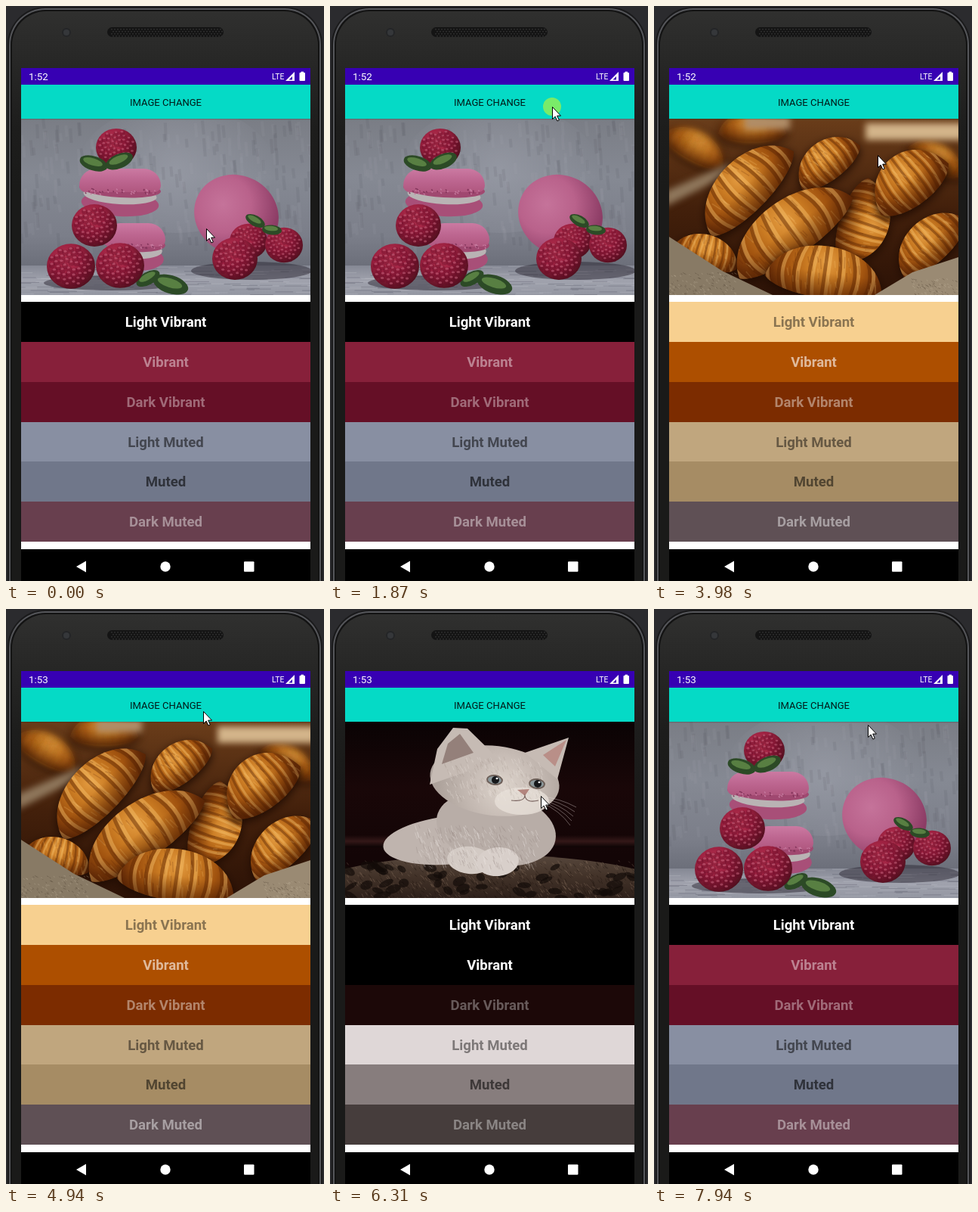
Write an HTML page with a canvas that moves like this. It is 421 px wide and 760 px high and loops after 8 s.

```html
<!DOCTYPE html>
<html lang="en">
<head>
<meta charset="utf-8">
<title>Image palette</title>
<style>
html, body { margin: 0; width: 100%; height: 100%; overflow: hidden; background: #2b2b2e; }
#stage { position: absolute; left: 0; top: 0; width: 421px; height: 760px; overflow: hidden; font-family: Roboto, Arial, sans-serif; }
#stage > * { position: absolute; }
#stage canvas { left: 0; top: 0; }
.row { left: 20px; width: 383px; text-align: center; font-weight: 700; font-size: 18.6px; line-height: 55px; }
#btn { left: 20px; top: 104px; width: 383px; text-align: center; font-size: 13.05px; line-height: 47px; color: #021b19; }
#clock { left: 30px; top: 86px; font-size: 13.4px; line-height: 16px; color: #fff; }
#net { left: 352px; top: 86px; font-size: 10.4px; line-height: 15px; color: #fff; }
</style>
</head>
<body>
<div id="stage">
<canvas id="base" width="421" height="760"></canvas>
<div id="clock">1:52</div>
<div id="net">LTE</div>
<div id="btn">IMAGE CHANGE</div>
<canvas id="over" width="421" height="760"></canvas>
</div>
<script>
const LOOP = 8000, TICK = 68.5, TAU = Math.PI * 2;
const stage = document.getElementById('stage');
const clock = document.getElementById('clock');
const base = document.getElementById('base').getContext('2d');
const over = document.getElementById('over').getContext('2d');

let seed = 7;
function rnd(a = 0, b = 1) {
  seed = (seed * 16807) % 2147483647;
  return a + (b - a) * seed / 2147483647;
}
function fade(g, cols) {
  cols.forEach((col, i) => g.addColorStop(i / (cols.length - 1), col));
  return g;
}
const down = (c, y0, y1, ...cols) => fade(c.createLinearGradient(0, y0, 0, y1), cols);
const glow = (c, x, y, r, ...cols) => fade(c.createRadialGradient(x, y, 0, x, y, r), cols);

function rect(c, x, y, w, h, fill, r = 0) {
  c.beginPath(); c.roundRect(x, y, w, h, r); c.fillStyle = fill; c.fill();
}
function oval(c, x, y, rx, ry, fill, rot = 0) {
  c.beginPath(); c.ellipse(x, y, rx, ry, rot, 0, TAU); c.fillStyle = fill; c.fill();
}
function poly(c, fill, ...pts) {
  c.beginPath();
  for (let i = 0; i < pts.length; i += 2) c.lineTo(pts[i], pts[i + 1]);
  c.closePath(); c.fillStyle = fill; c.fill();
}
// n short strokes scattered over a box
function grain(c, n, x, y, w, h, dx, dy, width, ...cols) {
  c.lineWidth = width;
  for (let i = 0; i < n; i++) {
    const px = x + rnd() * w, py = y + rnd() * h;
    c.strokeStyle = cols[i % cols.length];
    c.beginPath(); c.moveTo(px, py); c.lineTo(px + dx * rnd(.4, 1), py + dy * rnd(.4, 1)); c.stroke();
  }
}
function photo(draw) {
  const cv = document.createElement('canvas');
  cv.width = 383; cv.height = 233;
  const c = cv.getContext('2d');
  c.translate(-20, -149);
  draw(c);
  return cv;
}

function berry(c, x, y, r = 30) {
  oval(c, x, y, r, r * .93, glow(c, x - r * .2, y - r * .3, r * 1.3, '#b83552', '#9c2040', '#52101f'));
  for (let i = 1; i < 48; i++) {
    const d = Math.sqrt(i / 48) * r * .88, px = x + Math.cos(i * 2.4) * d, py = y + Math.sin(i * 2.4) * d * .93;
    oval(c, px, py + 1, r * .13, r * .12, 'rgba(95,10,34,.35)');
    oval(c, px - .5, py - 1, r * .07, r * .05, 'rgba(230,130,155,.4)');
  }
}
function leaf(c, x, y, len, rot) {
  oval(c, x, y, len, len * .5, '#2c4a26', rot);
  oval(c, x - 1, y - 2, len * .7, len * .25, '#587f42', rot);
}
function macaron(c, x, y, w) {
  oval(c, x, y + 46, w * .95, 17, '#a84f78', .06);
  oval(c, x, y + 35, w * .9, 12, '#b9b3b4', .06);
  oval(c, x, y + 27, w, 11, '#a04870', .06);
  rect(c, x - w, y, w * 2, 31, down(c, y, y + 31, '#cb7aa2', '#bd6690', '#b0577f'), [26, 26, 10, 10]);
  grain(c, 40, x - w * .9, y + 26, w * 1.8, 7, 2, 2, 1.5, '#c67a9f', '#84365c');
}
const sweets = photo(c => {
  rect(c, 20, 149, 383, 233, down(c, 149, 382, '#7a7d85', '#858993', '#7b7e89', '#5d606b'));
  oval(c, 225, 215, 130, 85, glow(c, 225, 215, 130, 'rgba(160,163,174,.55)', 'rgba(160,163,174,0)'));
  grain(c, 250, 20, 149, 383, 165, 2, 24, 4, 'rgba(64,66,76,.1)', 'rgba(180,182,192,.09)');
  rect(c, 20, 343, 383, 39, down(c, 343, 382, '#858894', '#a0a2ad', '#9497a2'));
  grain(c, 120, 0, 344, 400, 38, 40, 0, 1, 'rgba(70,72,86,.3)', 'rgba(205,206,214,.25)');
  oval(c, 325, 350, 80, 12, 'rgba(45,40,52,.5)');
  oval(c, 140, 366, 90, 10, 'rgba(45,40,52,.5)');
  oval(c, 305, 276, 57, 52, glow(c, 287, 262, 75, '#c5739a', '#b9628b', '#8c3c65'), .5);
  macaron(c, 170, 287, 41);
  macaron(c, 151, 215, 54);
  berry(c, 146, 187, 27);
  leaf(c, 116, 208, 19, .3); leaf(c, 150, 205, 19, -.4);
  leaf(c, 188, 360, 17, -.5); leaf(c, 218, 368, 24, .3);
  berry(c, 117, 290); berry(c, 86, 344, 32); berry(c, 151, 343, 32);
  berry(c, 321, 311, 25); berry(c, 368, 316, 25);
  leaf(c, 330, 284, 14, .5); leaf(c, 352, 296, 13, .1);
  berry(c, 303, 334);
});

function croissant(c, x, y, len, rot, fat = .47) {
  const w = len * fat;
  c.save(); c.translate(x, y); c.rotate(rot);
  c.shadowColor = '#1f0b02'; c.shadowBlur = 12; c.shadowOffsetY = 4;
  c.beginPath();
  c.moveTo(-len, w * .4);
  c.bezierCurveTo(-len * .8, -w * 1.4, len * .8, -w * 1.4, len, w * .4);
  c.bezierCurveTo(len * .7, w * 1.1, -len * .7, w * 1.1, -len, w * .4);
  c.fillStyle = glow(c, 0, -w * .35, len, '#e39b40', '#c97a22', '#a1530f', '#632a07');
  c.fill(); c.clip();
  c.shadowColor = 'transparent';
  for (let k = -4; k <= 4; k++) {
    const px = k * len * .24;
    ['rgba(90,36,4,.45)', 'rgba(250,200,115,.4)'].forEach((col, j) => {
      c.strokeStyle = col; c.lineWidth = len * .06;
      c.beginPath(); c.moveTo(px * .8 + j * 5, -w);
      c.quadraticCurveTo(px * 1.3 + j * 5, 0, px * .9 + j * 5, w); c.stroke();
    });
  }
  grain(c, 50, -len, -w, len * 2, w * 1.5, 3, len * .2, 1.5, 'rgba(255,205,120,.2)', 'rgba(95,38,4,.2)');
  rect(c, -len, 0, len * 2, w, down(c, 0, w, 'rgba(70,26,0,0)', 'rgba(60,20,0,.6)'));
  c.restore();
}
const bakery = photo(c => {
  rect(c, 20, 149, 383, 233, down(c, 149, 382, '#6a3d1a', '#43200b', '#2c1206'));
  c.filter = 'blur(4px)';
  croissant(c, 55, 185, 45, .5); croissant(c, 130, 160, 45, 0); croissant(c, 375, 200, 40, .5);
  rect(c, 280, 155, 130, 22, '#d3b48a');
  rect(c, 120, 145, 60, 18, '#b08d68');
  poly(c, '#8f775c', 15, 245, 100, 208, 100, 222, 15, 265);
  c.filter = 'none';
  croissant(c, 228, 205, 48, -.65, .58);
  croissant(c, 120, 238, 78, -.8);
  croissant(c, 278, 287, 58, 1.9, .6);
  croissant(c, 364, 312, 56, -.75, .55);
  croissant(c, 336, 230, 56, -.65, .68);
  croissant(c, 68, 326, 46, .25, .55);
  croissant(c, 179, 294, 92, -.62, .43);
  croissant(c, 226, 352, 78, .14);
  poly(c, '#887a65', 20, 305, 90, 350, 157, 382, 20, 382);
  poly(c, '#9a8a73', 292, 382, 342, 352, 403, 332, 403, 382);
  grain(c, 130, 20, 352, 90, 30, 3, 2, 1, 'rgba(60,48,36,.3)', 'rgba(205,192,170,.3)');
  grain(c, 100, 340, 360, 60, 22, 3, 2, 1, 'rgba(60,48,36,.3)', 'rgba(205,192,170,.3)');
});

const cat = photo(c => {
  const fur = '#c6bbb4';
  rect(c, 20, 149, 383, 233, down(c, 149, 325, '#0a0304', '#190708', '#130506'));
  rect(c, 20, 299, 383, 16, down(c, 299, 315, '#150607', '#341818', '#0c0404'));
  oval(c, 211, 382, 260, 57, down(c, 325, 382, '#57473c', '#423228', '#2e211b'));
  grain(c, 700, 20, 332, 383, 50, 4, 5, 1, 'rgba(150,125,104,.35)', 'rgba(25,15,12,.4)');
  for (let i = 0; i < 50; i++) oval(c, rnd(20, 403), rnd(336, 382), rnd(5, 12), rnd(3, 6), 'rgba(18,11,9,.7)', rnd(-.7, .7));

  oval(c, 165, 305, 95, 32, '#bfb4ae', -.1);
  oval(c, 220, 290, 80, 48, '#b8ada7', .2);
  oval(c, 218, 227, 86, 46, glow(c, 230, 235, 88, '#ddd4cc', fur, '#ada29b'), .12);
  poly(c, fur, 132, 232, 142, 185, 163, 157, 182, 158, 225, 200);
  poly(c, fur, 258, 190, 316, 170, 301, 225);
  poly(c, '#94807a', 148, 205, 156, 178, 172, 165, 190, 190);
  poly(c, '#b98f88', 282, 193, 313, 173, 298, 208);
  oval(c, 254, 254, 36, 18, 'rgba(232,224,217,.8)');
  oval(c, 185, 332, 30, 18, '#d3cac4', .1);
  oval(c, 222, 334, 28, 19, '#d8cfca', -.1);
  grain(c, 300, 110, 285, 165, 55, 4, 9, 1, 'rgba(238,232,228,.35)', 'rgba(132,118,111,.25)');
  grain(c, 220, 150, 195, 130, 55, 3, 7, 1, 'rgba(240,234,228,.3)', 'rgba(145,128,119,.2)');
  [[218, 226], [274, 231]].forEach(([x, y]) => {
    oval(c, x, y, 11, 7, '#6d5f58', .12);
    oval(c, x, y, 9, 5, '#8b979a', .12);
    oval(c, x + 1, y, 5, 5, '#15171a');
    oval(c, x + 3, y - 2, 1.5, 1.3, '#fff');
  });
  poly(c, '#b3857e', 248, 239, 264, 238, 258, 247);
  c.strokeStyle = '#77615c'; c.lineWidth = 1.2;
  c.beginPath(); c.moveTo(240, 253); c.quadraticCurveTo(257, 255, 258, 247); c.quadraticCurveTo(260, 257, 276, 253); c.stroke();
  c.strokeStyle = 'rgba(230,222,218,.55)'; c.lineWidth = .7;
  for (let i = 0; i < 5; i++) {
    c.beginPath(); c.moveTo(280, 248 + i * 2); c.quadraticCurveTo(304, 250 + i * 4, 326 - i * 2, 262 + i * 6); c.stroke();
  }
});

// text takes the lowest opacity, white first, that reaches a contrast of 3
const rgb = hex => [1, 3, 5].map(i => parseInt(hex.slice(i, i + 2), 16));
const lum = col => col.reduce((s, v, i) => s + [.2126, .7152, .0722][i] * Math.pow(v / 255, 2.2), 0);
function contrast(a, b) {
  const [lo, hi] = [lum(a), lum(b)].sort((p, q) => p - q);
  return (hi + .05) / (lo + .05);
}
function textOn(hex) {
  const bg = rgb(hex), white = [255, 255, 255];
  if (!lum(bg)) return '#fff';
  const ink = contrast(white, bg) >= 4.5 ? 255 : 0;
  for (let a = 0; a < 1; a += .01) {
    const mix = bg.map(v => v + (ink - v) * a);
    if (contrast(mix, bg) >= 3) return `rgb(${mix.map(Math.round)})`;
  }
  return `rgb(${[ink, ink, ink]})`;
}

const looks = [
  [sweets, '#000000', '#87203a', '#650f26', '#888fa2', '#70778a', '#683f4e'],
  [bakery, '#f7d090', '#ad4f00', '#7c2c00', '#c0a67e', '#a68c64', '#5f5055'],
  [cat, '#000000', '#000000', '#1c0808', '#dfd7d7', '#877d7d', '#463d3c']
];
const rowY = i => Math.round(391 + i * 52.85);
const rows = ['Light Vibrant', 'Vibrant', 'Dark Vibrant', 'Light Muted', 'Muted', 'Dark Muted'].map((name, i) => {
  const el = document.createElement('div');
  el.className = 'row';
  el.textContent = name;
  el.style.top = rowY(i) + 'px';
  el.style.height = rowY(i + 1) - rowY(i) + 'px';
  return stage.insertBefore(el, over.canvas);
});

function phone(c) {
  rect(c, 0, 0, 421, 760, '#2b2b2e');
  ['#1a1a1b', '#55565a', '#131313'].forEach((col, i) => rect(c, 2 + i * 2, 1 + i * 2, 417 - i * 4, 850, col, 50 - i * 2));
  rect(c, 8, 7, 405, 850, down(c, 5, 240, '#30302f', '#262625', '#1d1d1c', '#1a1a19'), 45);
  rect(c, 134, 28, 154, 13, '#141414', 6.5);
  for (let y = 30; y < 40; y += 3) for (let x = 139; x < 285; x += 4) rect(c, x + (y % 2) * 2, y, 2, 1.5, '#2c2c2c');
  oval(c, 80, 35, 6, 6, '#242527');
  oval(c, 80, 35, 4, 4, '#35373a');
  rect(c, 20, 82, 383, 678, '#fff');
  rect(c, 20, 82, 383, 22, '#3700b3');
  rect(c, 20, 104, 383, 45, '#05dac6');
  rect(c, 20, 718, 383, 42, '#000');
  poly(c, '#fff', 370, 99, 382, 87, 382, 99);
  poly(c, '#3700b3', 374.5, 97.5, 379, 93, 379, 97.5);
  rect(c, 388.5, 88, 7.5, 11, '#fff', 1);
  rect(c, 390.5, 86.7, 3.5, 2, '#fff');
  poly(c, '#fff', 93, 741, 106, 733.5, 106, 748.5);
  oval(c, 211, 741, 6.7, 6.7, '#fff');
  rect(c, 315, 734.3, 13.5, 13.5, '#fff', 1);
}
phone(base);

// pointer moves: start, end, then where it arrives
const home = [265, 296];
const moves = [
  [0, 230, 284, 225], [440, 570, 281, 230], [700, 1530, 294, 133],
  [3150, 3600, 292, 322], [3600, 3980, 296, 197], [3980, 4610, 261, 135],
  [5010, 5630, 279, 252], [6240, 6930, 275, 128], [7660, 7940, 283, 153]
];
const swaps = [2140, 5010, 7400];
const HOLD = 265, PRESS = 140;
const ease = k => k * k * (3 - 2 * k);

function tip(t) {
  let [x, y] = home;
  for (const [t0, t1, x1, y1] of moves) {
    const k = ease(Math.min(1, Math.max(0, (t - t0) / (t1 - t0))));
    x += (x1 - x) * k;
    y += (y1 - y) * k;
  }
  return [Math.round(x), Math.round(y)];
}
function pointer(c, t) {
  const [x, y] = tip(Math.floor((t + 10) / TICK) * TICK + 20);
  const pressed = swaps.some(s => t < s - HOLD && t >= s - HOLD - PRESS);
  c.clearRect(0, 0, 421, 760);
  if (pressed) oval(c, x, y, 12, 12, 'rgba(255,255,0,.47)');
  c.save(); c.translate(x + .5, y + .5);
  poly(c, '#fff', 0, 0, 0, 16, 3.7, 12.6, 6.4, 18.5, 8.8, 17.5, 6.2, 11.6, 11, 11.6);
  c.strokeStyle = '#000'; c.stroke();
  c.restore();
}

let shown = -1;
function show(n) {
  if (n === shown) return;
  shown = n;
  const [img, ...cols] = looks[n];
  base.drawImage(img, 20, 149);
  rect(base, 20, 149, 383, 2, down(base, 149, 151, 'rgba(0,0,0,.22)', 'rgba(0,0,0,0)'));
  rows.forEach((el, i) => {
    el.style.background = cols[i];
    el.style.color = textOn(cols[i]);
  });
}
function frame() {
  const t = performance.now() % LOOP;
  show(swaps.filter(s => t >= s).length % looks.length);
  clock.textContent = t < 4400 ? '1:52' : '1:53';
  pointer(over, t);
  requestAnimationFrame(frame);
}
frame();
</script>
</body>
</html>
```
